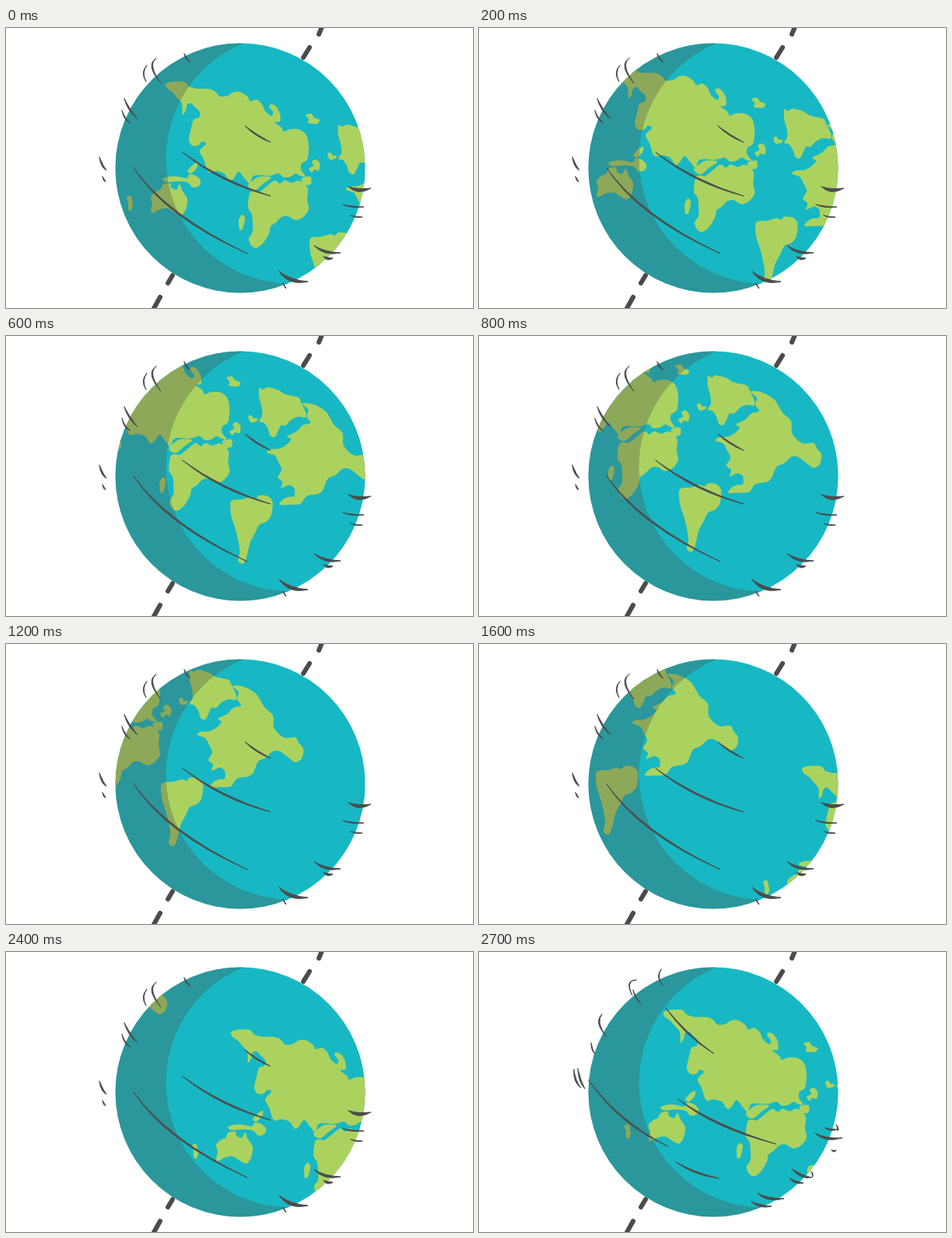
These frames come from a looping animation (600 by 360 pixels, 2.8 s). An HTML page with a canvas:

```html
<!DOCTYPE html>
<html lang="en">
<head>
<meta charset="utf-8">
<title>Spinning globe</title>
<style>
html, body { margin: 0; width: 600px; height: 360px; overflow: hidden; background: #fff; }
canvas { display: block; }
</style>
</head>
<body>
<canvas id="stage" width="600" height="360"></canvas>
<script>
const ctx = document.getElementById('stage').getContext('2d');
const LOOP = 2800, STEP = 100, KEY_TIME = 400;
const GLOBE = { x: 301, y: 180, r: 160.5 };
const MAP_REPEAT = [450, 194];

// Drift of the map, one key every 400 ms
const driftX = [0, -69, -133, -191, -240, -298, -366, -435.5];
const driftY = [0, -40, -73.5, -91, -106, -131, -163, -197];

// Each land: an anchor and a closed outline around it
const lands = {
  eurasia: [0, 0, '205,72 213,69 229,69 235,75 245,78 259,78 268,81 275,88 285,87 291,83 300,82 310,88 314,94 322,92 329,98 333,107 341,113 343,108 338,101 341,98 347,101 352,110 352,120 345,121 354,128 357,133 366,130 378,131 386,138 389,152 387,169 380,174 379,182 385,191 378,190 372,187 366,191 357,192 350,187 338,190 324,189 317,191 313,200 307,194 299,185 292,194 287,196 280,187 270,184 260,185 254,169 249,158 257,149 252,146 247,151 239,151 235,143 238,129 241,118 248,115 249,108 243,102 238,97 233,98 231,106 227,111 226,97 220,90 214,83 207,78'],
  balkans: [0, 0, '388,191 392,192 392,200 387,202 381,198 380,193'],
  arabia: [0, 0, '311,202 317,196 326,191 341,192 331,200 321,208 314,207'],
  africa: [0, 0, '313,213 319,210 325,211 333,205 345,196 352,200 358,196 367,199 376,196 384,200 388,208 387,221 389,233 382,243 372,247 362,242 354,243 347,250 340,255 338,264 330,277 321,283 314,278 312,270 317,261 316,240 311,231'],
  madagascar: [0, 0, '303,240 307,244 304,258 300,259 299,247'],
  isles: [0, 0, '398,169 403,174 402,183 396,182 393,186 389,181 395,177 393,172'],
  iceland: [0, 0, '413,162 417,160 420,164 425,164 423,168 416,169'],
  arctic: [0, 0, '385,112 392,110 396,115 403,118 400,123 394,123 388,122 389,117'],
  australia: [-152, -63, '338,280 345,273 350,271 354,264 363,263 364,268 371,271 375,264 379,273 385,283 383,296 377,304 368,300 360,295 350,296 340,301 338,297 340,289'],
  indonesia: [-152, -63, '353,257 362,254 372,254 384,256 388,251 396,253 402,259 400,266 392,268 386,262 375,260 358,261'],
  philippines: [-152, -63, '385,247 392,239 398,236 397,243 390,250'],
  zealand: [-152, -63, '307,281 312,279 314,285 315,292 312,298 309,295 309,288'],
  southAmerica: [69, 40, '321,233 325,229 337,228 348,225 354,227 358,223 369,224 375,231 375,240 373,250 367,257 358,261 353,271 347,282 344,293 341,305 337,311 332,309 331,304 333,297 332,286 329,272 326,262 322,249'],
  greenland: [69, 40, '358,85 363,87 369,84 383,88 391,93 408,97 412,104 418,117 417,123 408,122 399,126 392,133 386,133 383,139 378,148 372,146 369,137 364,130 358,128 362,120 361,109 358,98'],
  northAmerica: [191, 91, '291,54 302,54 314,59 323,66 332,81 343,92 344,107 352,117 360,121 372,120 376,127 382,135 380,147 372,152 364,147 352,138 343,138 334,146 324,151 318,165 312,170 297,173 289,183 277,184 262,184 267,177 274,174 281,173 281,163 274,159 264,163 266,155 260,149 265,139 261,130 256,121 246,117 250,113 262,112 271,107 277,100 272,96 284,90 292,82 302,79 297,71 299,62']
};

// Wind strokes: start, bend, end, thickness
const windPoses = [
  ['181,48 173,57 180,69 2', '193,39 180,47 199,71 2.6', '229,33 231,40 237,44 2.4',
   '152,91 157,105 169,117 2.8', '149,106 152,118 160,122 2.4', '120,166 123,178 129,183 3',
   '124,191 126,196 128,198 2.5', '164,180 206,242 310,290 3', '227,160 276,198 340,216 2.8',
   '307,126 322,139 340,147 2.6', '440,204 452,212 469,206 5', '433,227 444,231 460,230 2.4',
   '443,241 450,244 458,243 2', '396,280 409,291 430,289 4', '408,294 413,298 420,296 4',
   '351,313 364,328 388,326 5', '356,328 358,333 360,335 2'],
  ['202,36 187,36 197,56 2', '198,49 201,60 208,67 2', '234,22 227,32 236,43 2',
   '158,80 148,90 164,109 2.4', '144,117 145,127 149,131 2', '122,151 122,166 131,175 2.8',
   '127,150 129,166 136,176 2.8', '141,165 180,220 243,250 2.8', '240,72 266,107 302,131 2.8',
   '256,189 300,224 382,247 3.2', '253,270 275,285 308,291 3', '432,233 444,243 467,239 4',
   '444,226 452,230 461,228 2.6', '459,222 462,226 461,230 2', '453,255 456,257 459,255 3',
   '402,279 414,290 427,290 4', '427,282 430,286 428,290 2', '399,291 405,297 417,297 3.5',
   '358,310 370,320 392,317 4', '350,321 360,328 376,327 4']
];

const axis = [[407, -4, 402, 8], [390, 25, 382, 38], [214, 318, 208, 328], [198, 346, 188, 364]];

// Closed smooth outline through the given points
function outline(dx, dy, text) {
  const pts = text.split(' ').map(p => p.split(',').map(Number));
  const at = i => pts[(i + pts.length) % pts.length];
  const path = new Path2D();
  path.moveTo(pts[0][0] + dx, pts[0][1] + dy);
  pts.forEach((p, i) => {
    const prev = at(i - 1), q = at(i + 1), next = at(i + 2);
    path.bezierCurveTo(
      p[0] + (q[0] - prev[0]) / 7 + dx, p[1] + (q[1] - prev[1]) / 7 + dy,
      q[0] - (next[0] - p[0]) / 7 + dx, q[1] - (next[1] - p[1]) / 7 + dy,
      q[0] + dx, q[1] + dy);
  });
  path.closePath();
  return path;
}

// Brush stroke, thick in the middle and thin at both ends
function brush(text) {
  const [x0, y0, cx, cy, x1, y1, w] = text.split(/[ ,]/).map(Number);
  const len = Math.hypot(x1 - x0, y1 - y0);
  const nx = (y0 - y1) / len * (w - 1), ny = (x1 - x0) / len * (w - 1);
  const path = new Path2D();
  path.moveTo(x0, y0);
  path.quadraticCurveTo(cx + nx, cy + ny, x1, y1);
  path.quadraticCurveTo(cx - nx, cy - ny, x0, y0);
  path.closePath();
  return path;
}

const landPaths = Object.values(lands).map(land => outline(...land));
const windPaths = windPoses.map(pose => pose.map(brush));

// Catmull-Rom interpolation of evenly spaced keys
function spline(keys, t) {
  const i = Math.min(Math.floor(t / KEY_TIME), keys.length - 2);
  const u = t / KEY_TIME - i;
  const b = keys[i], c = keys[i + 1];
  const a = i ? keys[i - 1] : 2 * b - c;
  const d = i + 2 < keys.length ? keys[i + 2] : 2 * c - b;
  return b + u / 2 * (c - a + u * (2 * a - 5 * b + 4 * c - d + u * (3 * (b - c) + d - a)));
}

function circle(x, y, r) {
  ctx.moveTo(x + r, y);
  ctx.arc(x, y, r, 0, Math.PI * 2);
}

function draw(t) {
  ctx.fillStyle = '#fff';
  ctx.fillRect(0, 0, 600, 360);

  ctx.lineCap = ctx.lineJoin = 'round';
  ctx.strokeStyle = '#4b4b4d';
  ctx.lineWidth = 6;
  ctx.beginPath();
  for (const [x0, y0, x1, y1] of axis) {
    ctx.moveTo(x0, y0);
    ctx.lineTo(x1, y1);
  }
  ctx.stroke();

  ctx.save();
  ctx.beginPath();
  circle(GLOBE.x, GLOBE.y, GLOBE.r);
  ctx.fillStyle = '#17b8c3';
  ctx.fill();
  ctx.clip();

  ctx.fillStyle = '#abd25f';
  const dx = spline(driftX, t), dy = spline(driftY, t);
  for (const copy of [0, 1]) {
    ctx.save();
    ctx.translate(dx + copy * MAP_REPEAT[0], dy + copy * MAP_REPEAT[1]);
    landPaths.forEach(path => ctx.fill(path));
    ctx.restore();
  }

  // Night side: everything outside the shifted disc
  ctx.beginPath();
  ctx.rect(0, 0, 600, 360);
  circle(366, 168, GLOBE.r);
  ctx.fillStyle = 'rgba(80, 84, 74, .33)';
  ctx.fill('evenodd');
  ctx.restore();

  ctx.fillStyle = ctx.strokeStyle = '#4b4d4d';
  ctx.lineWidth = 1;
  for (const path of windPaths[t / STEP % 2]) {
    ctx.fill(path);
    ctx.stroke(path);
  }
}

function tick() {
  const t = performance.now() % LOOP;
  draw(Math.floor(t / STEP) * STEP);
  requestAnimationFrame(tick);
}
tick();
</script>
</body>
</html>
```
